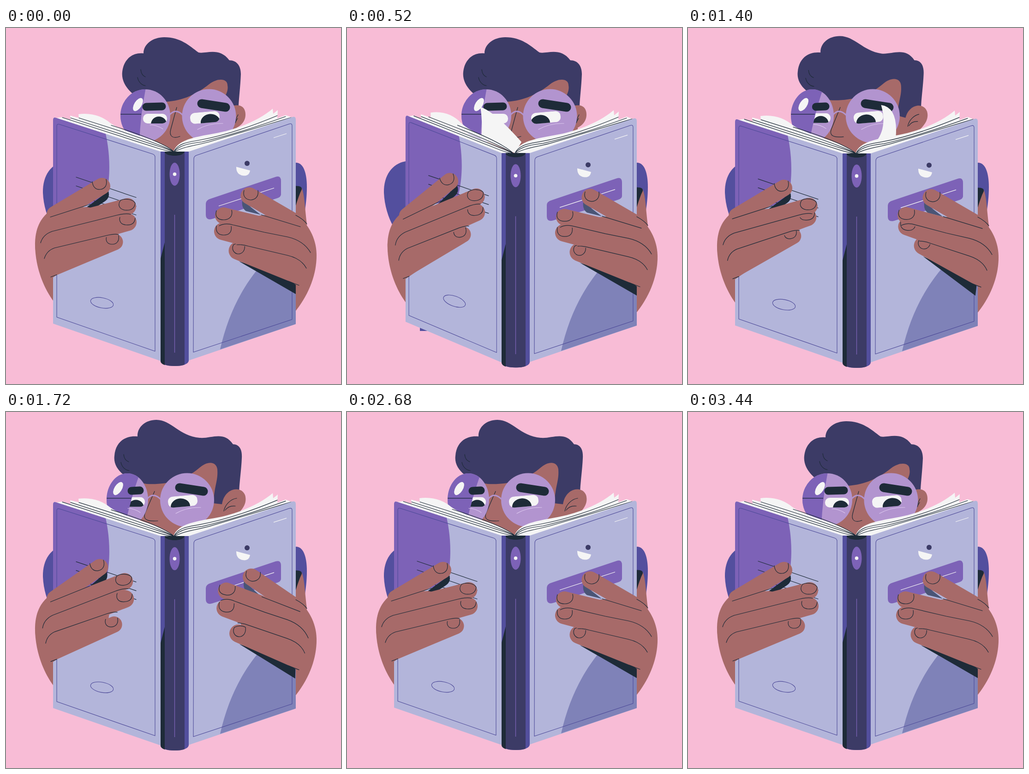
These frames come from a looping animation (726x772 px, 3.48 s). An HTML page:

```html
<!DOCTYPE html>
<html lang="en">
<head>
<meta charset="utf-8">
<title>Reader</title>
<style>
html, body { margin: 0; width: 100%; height: 100%; overflow: hidden; background: #f8bcd6; }
svg { display: block; width: 100vw; height: 100vh; }
.skin { fill: #a76a69; }
.hair { fill: #3c3b66; }
.lens { fill: #b294cf; }
.violet { fill: #7d62b7; }
.white { fill: #f5f5f5; }
.dark { fill: #1e2b38; }
.cover { fill: #b3b5da; }
.cloth { fill: #534f9e; }
.ink, .frame, .glint, .brow { fill: none; stroke-linecap: round; stroke-linejoin: round; }
.ink { stroke: #1e2b38; stroke-width: 1.2; }
.frame { stroke: #4d4a98; stroke-width: 1.1; }
.glint { stroke: #dcc8ee; stroke-width: 1.1; }
.brow { stroke: #1e2b38; stroke-width: 17; }
.bone { stroke: #a76a69; stroke-linecap: round; }
</style>
</head>
<body>
<svg viewBox="0 0 726 772" preserveAspectRatio="none">
<defs>
  <clipPath id="lensClip"><circle r="1" transform="translate(302 190) scale(54 57)" data-turn="translate(263 190) scale(45 57)"/></clipPath>
  <clipPath id="eyeClipL"><rect x="-26" y="-10" width="52" height="21" rx="10"/></clipPath>
  <clipPath id="eyeClipR"><rect x="-32" y="-12" width="64" height="24" rx="11"/></clipPath>
  <clipPath id="coverClip"><path class="fold" d="M102 200Q102 192 109 195L335 268L335 722L102 641Z"/></clipPath>
</defs>
<rect width="726" height="772" fill="#f8bcd6"/>

<g id="body" class="cloth">
  <path d="M180 285L127 289C98 294 79 320 80 357C81 385 90 412 100 430L180 440Z"/>
  <path d="M600 292L628 292C645 292 652 315 652 345C652 365 650 380 648 395L600 395Z"/>
  <path d="M158 285H560V657H158Z"/>
</g>

<g id="head">
  <path class="skin" d="M298 145L480 108L500 170L500 255L364 275L300 255Z" data-turn="M282 145L458 106L474 190L474 255L364 275L284 235Z"/>
  <path class="hair" d="M275 143C258 128 250 112 252 95C255 68 274 52 298 55C298 35 318 20 343 20C378 20 397 38 417 53C432 57 462 40 484 70C500 70 509 82 509 100C508 125 505 150 504 168L490 168L474 150C478 142 482 134 480 124C480 110 460 107 440 122C415 142 385 158 345 160L300 160Z"
    data-turn="M256 137C240 125 233 110 235 95C237 66 258 50 285 53C284 33 302 17 326 17C358 17 375 52 420 56C445 58 472 40 492 70C507 70 512 83 511 100C510 125 506 150 505 175L468 200L450 198C451 160 460 150 458 124C456 108 438 104 418 122C385 150 345 158 305 156L280 152Z"/>
  <path class="ink" d="M292 90C293 100 297 104 302 106M285 107C287 117 294 124 302 125" data-turn="M255 92C256 102 260 106 266 108M249 109C251 119 258 126 267 127"/>
  <path class="skin" d="M488 170C508 163 519 172 519 188C519 200 512 210 500 216L488 216Z" data-turn="M468 200C473 165 509 158 518 180C524 200 510 215 490 232L468 232Z"/>
  <path class="ink" d="M497 205C498 198 500 193 503 188M497 206C498 201 500 199 502 196" data-turn="M472 215C475 200 487 189 500 187M475 213C480 206 488 203 497 204"/>
  <path class="ink" d="M370 172L357 220C353 235 362 241 377 235" data-turn="M322 172L301 220C297 232 304 238 329 236"/>
  <path fill="none" stroke="#b294cf" stroke-width="3" d="M354 189Q368 172 384 190" data-turn="M306 189Q318 172 336 190"/>

  <circle class="lens" r="1" transform="translate(302 190) scale(54 57)" data-turn="translate(263 190) scale(45 57)"/>
  <circle class="lens" r="1" transform="translate(440 191) scale(58.5 58.5)" data-turn="translate(392.5 191) scale(58.5 58.5)"/>
  <g clip-path="url(#lensClip)">
    <g transform="translate(323 196)" data-turn="translate(275 194.5)">
      <g clip-path="url(#eyeClipL)">
        <rect class="white" x="-26" y="-10" width="52" height="21"/>
        <ellipse id="pupilL" class="dark" cy="12" rx="17" ry="16"/>
        <rect class="lens lid" x="-40" y="-14" width="80"/>
      </g>
    </g>
    <path class="violet" d="M303 130Q291 190 289 250L200 250L200 130Z" data-turn="M291 130Q271 185 257 250L180 250L180 130Z"/>
    <path d="M246 187L293 187" data-turn="M216 187L271 187" stroke="#3c3b66" stroke-width="2"/>
  </g>
  <ellipse class="white" rx="8" ry="16" transform="translate(286 166) rotate(32)" data-turn="translate(243 166) rotate(32)"/>
  <g transform="translate(431 194)" data-turn="translate(383 193.5)">
    <g transform="rotate(-5)" clip-path="url(#eyeClipR)">
      <rect class="white" x="-32" y="-12" width="64" height="24"/>
      <ellipse id="pupilR" class="dark" cy="11" rx="21" ry="17.5"/>
      <rect class="lens lid" x="-40" y="-14" width="80"/>
    </g>
  </g>
  <path class="brow" d="M304 171L338 170" data-turn="M272 171L290 170"/>
  <path class="brow" style="stroke-width:19" d="M424 164L476 172" data-turn="M376 164L428 172"/>
  <path class="glint" d="M312 210Q326 210 340 219" data-turn="M264 209Q278 209 291 218"/>
  <path class="glint" d="M415 220Q440 206 470 207" data-turn="M368 220Q392 206 422 207"/>
</g>

<g id="book">
  <path id="page" class="white"/>
  <g id="backR">
    <path class="skin" d="M618 420L628 385C632 370 636 350 641 347C647 360 648 395 652 424L650 440L618 440Z"/>
    <path class="dark" d="M620 343C636 341 642 344 641 350C636 360 632 372 628 385L620 385Z"/>
    <path class="skin" d="M618 625C655 584 674 535 673 490L618 490Z"/>
  </g>
  <path class="skin palmL" d="M112 604C79 566 62 512 63 465L112 465Z"/>

  <g id="right">
    <path class="white" d="M396 271L628 197L606 189L588 196L589 178L579 186L578 175C548 200 500 222 440 231C400 238 370 246 363 268Z"/>
    <path class="ink" d="M364 268C374 248 400 247 420 243C480 232 540 210 588 190M364 268C378 253 400 250 425 247C490 232 550 212 606 192M364 269C385 257 410 255 440 247L618 194"/>
    <path class="cover" d="M396 268L621 193Q628 191 628 199L628 642L396 721Z"/>
    <path fill="#7f82b8" d="M464 697C480 625 510 565 548 520L628 500L628 642Z"/>
    <path class="frame" d="M407 284Q407 278 413 276L614 208Q620 206 620 212L620 632L406 703Z"/>
    <path d="M580 238L608 229" stroke="#f5f5f5" stroke-width="1.3"/>
    <circle class="hair" cx="522.5" cy="293.5" r="5.5"/>
    <path class="white" d="M499 301L529 309C527 320 520 321 513 320C503 318 499 312 499 301Z"/>
    <path class="violet" d="M444 370L584 323Q596 319 596 332L596 361Q596 366 588 369L447 414Q433 418 433 405L433 381Q433 373 444 370Z"/>
    <path d="M461 386L581 347" stroke="#f5f5f5" stroke-width="1.3"/>
  </g>

  <g id="left">
    <path class="white" d="M157 187C185 183 210 192 226 206C260 230 330 240 365 268L158 197Z" data-fold="M182 180C210 176 233 186 248 203C278 230 330 240 365 268L182 192Z"/>
    <g class="fold">
      <path class="white" d="M106 196L122 193L140 199L139 190L158 195L365 268L335 271Z"/>
      <path class="ink" d="M122 194L330 261Q350 267 364 269M140 195L332 257Q352 263 364 269M158 195L215 213Q330 250 364 268M228 211Q335 244 364 268"/>
      <path class="cover" d="M102 200Q102 192 109 195L335 268L335 722L102 641Z"/>
    </g>
    <g clip-path="url(#coverClip)">
      <g id="art">
        <path class="violet" d="M90 180L216 200L216 229C226 275 226 320 219 355L215 375L90 400Z"/>
        <path class="ink" d="M152 323.5L282 367.5M152 342.5L282 386.5M152 361.5L282 405.5"/>
        <ellipse class="frame" rx="25" ry="11" transform="translate(208 596) rotate(11)" data-fold="translate(208 596) rotate(20)"/>
      </g>
    </g>
    <path class="frame fold" d="M110 213Q110 207 116 209L317 273Q323 275 323 280L323 701L110 627Z"/>
  </g>

  <g id="spine">
    <path class="cloth" d="M335 268L396 268L396 721C396 727 387 733 366 733C345 733 335 728 335 722Z"/>
    <path class="dark" d="M335 500L344 465L344 731Q335 728 335 722Z"/>
    <path class="hair" d="M344 268L387 268L387 730Q380 733 366 733Q352 733 344 730Z"/>
    <path class="dark" d="M344 268L387 268C385 275 374 277 365 277C357 277 347 275 344 270Z"/>
    <ellipse class="violet" cx="365.5" cy="317" rx="11" ry="25"/>
    <circle class="white" cx="365.5" cy="317" r="3.8"/>
    <path d="M365.5 405V704" stroke="#7d62b7" stroke-width="1.3"/>
  </g>

  <g class="palmL">
    <path id="shadeL" class="dark" d="M170 392L222 354Q226 368 214 376L190 392Z"/>
    <path class="skin" d="M102 541L82 535C68 505 63 490 63 465C64 430 78 408 98 395L175 388L230 400L220 460Z"/>
    <g id="fingersL"></g>
    <path class="ink" d="M97 540L110 535"/>
  </g>
  <g id="handR">
    <path id="shadeR" class="dark" d="M505 506L628 545L628 577Z"/>
    <path id="shadeTop" fill="#4a5576" d="M512 374L552 405L520 397Q510 390 512 374Z"/>
    <path class="skin" d="M628 557L656 545C668 520 673 505 673 490C672 455 655 425 628 402L556 406L505 412L510 470Z"/>
    <g id="fingersR"></g>
    <path class="ink" d="M612 549L635 558M628 406Q645 415 652 425"/>
  </g>
</g>
</svg>
<script>
const LOOP = 3480;
const $ = id => document.getElementById(id);
const all = q => [...document.querySelectorAll(q)];
const clamp = v => Math.min(1, Math.max(0, v));
const ease = u => u < .5 ? 4 * u ** 3 : 1 - (2 - 2 * u) ** 3 / 2;
const ramp = (t, start, len) => ease(clamp((t - start) / len));
const bump = (t, mid, half) => Math.abs(t - mid) < half ? Math.cos((t - mid) / half * Math.PI / 2) ** 2 : 0;

// Blend two strings that differ only in their numbers
function mix(a, b, k) {
  const to = b.match(/-?[\d.]+/g);
  let i = 0;
  return a.replace(/-?[\d.]+/g, n => +(+n + (to[i++] - n) * k).toFixed(2));
}

function track(keys, t) {
  let i = 0;
  while (i < keys.length - 2 && t > keys[i + 1][0]) i++;
  const [t0, a] = keys[i], [t1, b] = keys[i + 1];
  return [a, b, clamp((t - t0) / (t1 - t0))];
}

// Elements with a second pose in data-turn or data-fold
function morpher(key) {
  const list = all(`[data-${key}]`).map(el => {
    const attr = el.hasAttribute('d') ? 'd' : 'transform';
    return { el, attr, a: el.getAttribute(attr), b: el.dataset[key] };
  });
  return k => list.forEach(m => m.el.setAttribute(m.attr, mix(m.a, m.b, k)));
}
const poseHead = morpher('turn');
const poseCover = morpher('fold');
const foldParts = all('.fold'), palms = all('.palmL'), lids = all('.lid');

// Fingers from little to index: base, tip, width, crease, nail
const taps = [1400, 1580, 1730, 1930];
const fingers = [];
function addFinger(host, side, i, base, tip, width, crease, nail) {
  const g = document.createElementNS('http://www.w3.org/2000/svg', 'g');
  g.innerHTML = `<path class="bone" d="M${base}L${tip}" stroke-width="${width}"/><path class="ink" d="${crease}${nail}"/>`;
  $(host).append(g);
  fingers.push({ g, side, base, mid: taps[i] });
}
[
  ['95 523', '236 464', 35, '', 'M218 452C215 462 220 469 230 469C240 469 246 462 244 450'],
  ['90 470', '264 421', 38, 'M83 500Q88 483 105 477L222 449Q236 446 244 448', 'M249 405C243 416 247 426 260 427C272 428 279 424 280 412'],
  ['90 432', '264 387', 36, 'M75 466Q80 448 100 441L240 406Q260 401 270 404', 'M248 374C241 384 246 393 258 395C268 396 278 394 280 380C276 372 258 368 248 374'],
  ['106 404', '208 343', 36, 'M96 410L183 382', 'M187 333C188 345 195 351 204 350C215 349 220 340 217 328']
].forEach((f, i) => addFinger('fingersL', -1, i, ...f));
[
  ['628 534', '502 483', 39, '', 'M493 470C488 480 494 489 503 490C512 490 519 483 517 469C510 465 500 466 493 470'],
  ['640 486', '470 441', 38, 'M500 470Q512 469 525 473L610 493Q640 500 651 521', 'M456 429C454 442 460 449 472 449C484 449 490 442 488 429'],
  ['640 448', '471 407', 36, 'M462 429Q475 422 492 427L560 443L610 453Q645 461 660 487', 'M456 396C452 410 460 416 472 416C484 416 492 408 489 395'],
  ['627 422', '527 364', 37, 'M553 405L638 431', 'M516 352C512 365 520 372 530 373C542 372 548 364 546 352']
].forEach((f, i) => addFinger('fingersR', 1, i, ...f));
// Shadows move with the finger above them
fingers.push({ ...fingers[3], g: $('shadeL') }, { ...fingers[4], g: $('shadeR') }, { ...fingers[7], g: $('shadeTop') });

const pageKeys = [
  [200, 'M235 228Q190 205 172 192Q215 200 364 268L364 270Z'],
  [520, 'M291 238Q294 201 289 168Q320 178 378 244L364 268Z'],
  [880, 'M350 262Q354 198 343 158Q388 172 402 236L364 268Z'],
  [1400, 'M408 242Q432 211 418 163Q455 168 450 232L364 268Z'],
  [1720, 'M400 250Q520 215 580 186Q585 190 588 193L364 268Z']
];
const gazeKeys = [[0, 11], [140, 11], [440, -13], [560, -13], [880, -1], [1120, 3], [1400, -6], [2880, -5], [3310, 11], [LOOP, 11]];

function draw(t) {
  const turn = ramp(t, 1120, 430) - ramp(t, 2880, 430);
  poseHead(turn);

  const [g0, g1, gk] = track(gazeKeys, t);
  const gaze = g0 + (g1 - g0) * ease(gk);
  $('pupilL').setAttribute('cx', gaze * .75 + 11 * turn);
  $('pupilR').setAttribute('cx', gaze);
  const lid = 27 * bump(t, 1960, 160);
  for (const el of lids) el.setAttribute('height', lid);

  const bob = t < 2000 ? 6 * Math.sin(Math.PI * t / 2000) ** 2 : 0;
  $('book').setAttribute('transform', `translate(0 ${bob})`);

  const fold = bump(t, 480, 380);
  const sx = 1 - .11 * fold, shear = .032 * fold;
  const squeeze = `matrix(${sx} ${shear} 0 1 ${335 * (1 - sx)} ${-335 * shear})`;
  for (const el of foldParts) el.setAttribute('transform', squeeze);
  poseCover(fold);
  $('art').setAttribute('transform', `translate(${25.5 * fold} ${-7 * fold})`);
  for (const el of palms) el.setAttribute('transform', `translate(${25.5 * fold} 0)`);

  for (const f of fingers) {
    const lift = 7 * bump(t, f.mid, 480) + (f.side < 0 ? 8.4 * fold : 0);
    f.g.setAttribute('transform', `rotate(${f.side * lift} ${f.base})`);
  }

  $('page').setAttribute('d', t > 200 && t < 1720 ? mix(...track(pageKeys, t)) : '');
}

const start = performance.now();
function tick() {
  draw((performance.now() - start) % LOOP);
  requestAnimationFrame(tick);
}
tick();
</script>
</body>
</html>
```
